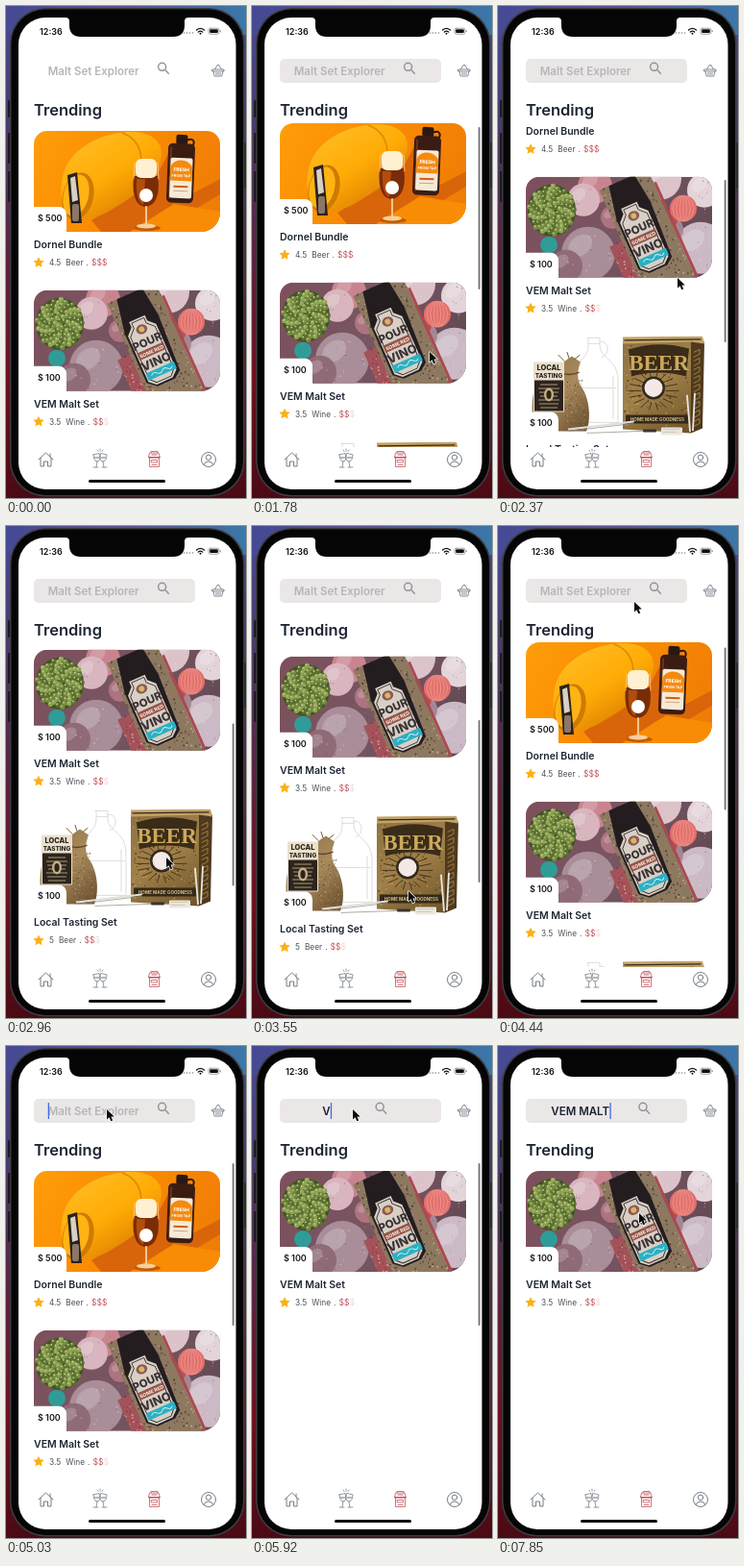
These frames come from a looping animation (250 by 512 pixels, 8 s). An HTML page with a canvas:

```html
<!DOCTYPE html>
<html lang="en">
<head>
<meta charset="utf-8">
<title>Shop list and search</title>
<style>
html, body { margin: 0; width: 100%; height: 100%; overflow: hidden; background: #000; }
canvas { display: block; width: 250px; height: 512px; }
</style>
</head>
<body>
<canvas id="stage"></canvas>
<script>
const LOOP = 8000, STEP = LOOP / 54;
const INK = '#1d2433', LINE = '#66707a', RED = '#c4545a';
const canvas = document.getElementById('stage');
const dpr = window.devicePixelRatio || 1;
canvas.width = 250 * dpr;
canvas.height = 512 * dpr;
const c = canvas.getContext('2d');

// Motion keys: [step, value...], linear in between
const CURSOR = [[5, 219, 374], [7, 181, 362], [11, 182, 364], [12, 185, 360], [14, 187, 312],
  [16, 187, 283], [17, 186, 283], [20, 167, 345], [22, 164, 373], [23, 164, 373], [24, 163, 380],
  [26, 162, 416], [27, 161, 396], [28, 156, 285], [29, 148, 150], [30, 142, 79], [31, 130, 70],
  [34, 105, 66], [49, 105, 66], [51, 125, 125], [53, 147, 174]];
const SCROLL = [[11, 0], [12, 8], [13, 28], [16, 118], [17, 140], [18, 155], [19, 164], [20, 167],
  [23, 167], [24, 160], [26, 124], [27, 80], [28, 44], [29, 22], [30, 9], [31, 4], [33, 0]];
const TYPING = [[40, 'V'], [41, 'VE'], [42, 'VEM'], [46, 'VEM '], [47, 'VEM M'], [48, 'VEM MA'],
  [49, 'VEM MAL'], [50, 'VEM MALT']];

function at(keys, n) {
  const i = keys.findIndex(k => k[0] >= n);
  if (i < 0) return keys[keys.length - 1].slice(1);
  if (i === 0) return keys[0].slice(1);
  const a = keys[i - 1], b = keys[i], p = (n - a[0]) / (b[0] - a[0]);
  return a.slice(1).map((v, j) => v + (b[j + 1] - v) * p);
}

function seeded(seed) {
  return () => (seed = (seed * 16807) % 2147483647) / 2147483647;
}

// Drawing helpers
function rect(color, x, y, w, h, r = 0) {
  c.fillStyle = color;
  c.beginPath();
  c.roundRect(x, y, w, h, r);
  c.fill();
}
function disc(color, x, y, rx, ry = rx, rot = 0) {
  c.fillStyle = color;
  c.beginPath();
  c.ellipse(x, y, rx, ry, rot, 0, 7);
  c.fill();
}
function shape(color, d) {
  c.fillStyle = color;
  c.fill(new Path2D(d));
}
function line(color, width, d) {
  c.strokeStyle = color;
  c.lineWidth = width;
  c.lineCap = c.lineJoin = 'round';
  c.stroke(new Path2D(d));
}
function text(s, x, y, size, weight, color, align = 'left', family = 'Inter, sans-serif') {
  c.font = `${weight} ${size}px ${family}`;
  c.textAlign = align;
  c.textBaseline = 'alphabetic';
  c.fillStyle = color;
  c.fillText(s, x, y);
  return c.measureText(s).width;
}
function group(x, y, draw, rot = 0) {
  c.save();
  c.translate(x, y);
  c.rotate(rot);
  draw();
  c.restore();
}
function ramp(x0, y0, x1, y1, ...colors) {
  const g = c.createLinearGradient(x0, y0, x1, y1);
  colors.forEach((k, i) => g.addColorStop(i / (colors.length - 1), k));
  return g;
}
function speckle(seed, count, x, y, w, h, size, ...colors) {
  const rnd = seeded(seed);
  for (let i = 0; i < count; i++) {
    disc(colors[i % colors.length], x + rnd() * w, y + rnd() * h, size * (.5 + rnd() * .5));
  }
}

// Card pictures, 194 x 105
function kegPicture() {
  rect(ramp(0, 0, 194, 105, '#ff9d08', '#f88a04', '#ee7a06'), 0, 0, 194, 105);
  shape('#d9650a', 'M60 93L124 54L140 24L152 30L152 72L194 50V66L128 105H70Z');
  shape('#f98c05', 'M100 105L146 76L194 84V105Z');
  shape(ramp(50, 5, 104, 90, '#ffbc20', '#ffab06', '#d87a02'),
    'M31 44C38 20 66 3 98 1C120 0 132 9 133 22C134 46 108 66 84 80C66 92 46 96 36 86C27 76 27 58 31 44Z');
  line('#e08a05', 1.5, 'M92 2C110 8 118 25 108 62');
  disc('#cf7a02', 46, 68, 16, 25, .25);
  disc('#ffb414', 44, 67, 13, 22, .25);
  shape('#2c211c', 'M35 46L45 43L50 96H39Z');
  shape('#d9d0c5', 'M38 49L43 47L46 72L40 74Z');
  rect('#8b7766', 40, 76, 7, 18, 2);
  // glass
  disc('#c15a08', 118, 101, 14, 3);
  shape('#7a2c08', 'M104 47C102 66 106 78 116 79C127 78 132 66 129 47Z');
  shape('#b24d0a', 'M107 50C106 66 109 75 114 77L116 50Z');
  rect('#fff0d2', 106, 29, 22, 20, 6);
  line('#f8cf95', .8, 'M105 33L104 50M129 33L130 50');
  line('#f4c78e', 2, 'M117 79V97');
  disc('#f6d09a', 117, 99, 10, 2.5);
  disc('#fff', 117, 67, 7);
  // bottle
  group(153, 44, () => {
    rect('#2b1712', -6, -40, 12, 10, 2);
    line('#2b1712', 2, 'M6 -35C13 -38 14 -31 10 -28');
    rect('#3b1c12', -14, -31, 28, 62, 5);
    rect('#6c3420', -12, -27, 2, 54, 1);
    rect('#f6ead6', -11, -16, 23, 42, 2);
    shape('#f58a10', 'M-11 8V-6C-8 -16 8 -16 12 -6V8Z');
    text('FRESH', .5, -2, 5, 800, '#fff', 'center');
    text('FROM TAP', .5, 4, 3.8, 700, '#fff', 'center');
    rect('#d45b18', -7, 13, 15, 2);
    rect('#c8a98a', -7, 18, 15, 1);
  }, .04);
}

function winePicture() {
  rect(ramp(0, 0, 194, 105, '#7d4f5b', '#775662', '#5d4651'), 0, 0, 194, 105);
  const balloons = [['#c9848f', 72, 10, 18], ['#d9b6bf', 60, 24, 17], ['#a98d99', 65, 80, 28],
    ['#8f6a77', 42, 93, 17], ['#dcc3c9', 140, 2, 22], ['#e3d4d9', 186, 14, 18],
    ['#cbbac5', 182, 74, 27], ['#a58895', 150, 55, 14], ['#ad7480', 90, 42, 12]];
  for (const [color, x, y, r] of balloons) {
    disc(color, x, y, r);
    disc('#ffffff30', x - r * .3, y - r * .3, r * .5, r * .36, -.7);
  }
  speckle(41, 130, 38, 4, 154, 100, .8, '#f4e4e690', '#5d404a70');
  disc('#2f9c98', 24, 71, 9);
  disc('#b84f50', 149, 45, 9);
  disc('#e2706c', 164, 33, 14);
  for (let i = -3; i < 4; i++) line('#f2a298', .7, `M${164 + i * 1.4} 20Q${164 + i * 6} 33 ${164 + i * 1.4} 46`);
  // grapes
  disc('#3f5322', 27, 35, 25, 27);
  for (let i = 0; i < 95; i++) {
    const a = i * 2.4, r = 2.45 * Math.sqrt(i);
    const x = 27 + Math.cos(a) * r, y = 35 + Math.sin(a) * r * 1.08;
    disc(['#768a40', '#8fa354', '#5b7030'][i % 3], x, y, 2.7);
    disc('#c3cf92', x - .8, y - .9, .9);
  }
  // box
  group(122, 55, () => {
    rect('#a4525a', -39, 2, 18, 70);
    speckle(7, 60, -39, 2, 18, 70, 1, '#d99a95', '#7b3640');
    rect('#8d7860', -25, -56, 55, 130);
    speckle(19, 260, -25, -56, 55, 130, 1.1, '#4b3b33', '#c0a582', '#6d5544');
    rect('#a94a50', 30, -40, 3, 110);
    shape('#241d20', 'M-14 -56H15L19 -24L16 38L8 44H-12L-21 36V-20Z');
    group(-1, 8, () => {
      shape('#d8d0c6', 'M-18 -24L-11 -31V-37H7V-31L14 -24V28L7 34H-11L-18 28Z');
      line('#3a2b2c', .9, 'M-16 -22L-9 -29V-35H5V-29L12 -22V26L6 32H-10L-16 26Z');
      disc('#8a5a50', -2, -25, 6, 5);
      disc('#d9b36a', -2, -25, 3);
      text('POUR', -2, -7, 11.5, 800, '#3a3234', 'center');
      rect('#94544c', -17, -4, 30, 8);
      text('SOME RED', -2, 2.3, 5.2, 800, '#f3e4d3', 'center');
      text('VINO', -2, 16, 12.5, 800, '#3a3234', 'center');
      rect('#2bb0c2', -17, 19, 32, 8, 1);
      line('#d5f0ef', .9, 'M-12 23Q-9 20 -6 23T0 23T6 23T11 23');
    });
  }, -.42);
}

function beerPicture() {
  rect('#fff', 0, 0, 194, 105);
  // glass jug
  line('#d4d4d0', .8, 'M64 2H77V10C78 25 95 22 96 46V90H48V46C49 24 65 26 65 10V2M65 8H77M50 54H94M77 6C87 4 88 20 79 22');
  line('#e6e6e2', 1.4, 'M54 40V84M91 42V86');
  // sack
  shape(ramp(5, 30, 66, 90, '#8f7148', '#a98a5c', '#6f5433'),
    'M14 29C24 34 38 30 42 25L48 21L57 27C54 36 52 44 58 53C67 66 68 88 63 99H9C5 80 6 64 10 52Z');
  line('#5f4526', 1.5, 'M38 39C44 41 50 40 55 38');
  line('#6b5a35', 1, 'M40 26L34 20M45 23L43 17M51 24L56 20');
  speckle(11, 110, 41, 46, 20, 52, .7, '#c3a473', '#5f4828');
  rect('#e9e0cd', 8, 27, 32, 52, 1);
  rect('#2c241d', 9, 46, 30, 32);
  text('LOCAL', 24, 36, 7.4, 800, '#2c241d', 'center');
  text('TASTING', 24, 44, 6.4, 800, '#2c241d', 'center');
  for (let y = 50; y < 76; y += 4) rect('#a99a78', 13 + y % 3, y, 22 - y % 3 * 2, 1);
  disc('#c6b083', 24, 61, 5, 7);
  disc('#2c241d', 24, 61, 2.6, 4.5);
  // box
  shape('#4f3a1e', 'M172 4L186 6L184 96L172 101Z');
  shape(ramp(101, 0, 172, 100, '#8d7040', '#a08049', '#6f5429'), 'M101 4H172V101L101 97Z');
  shape('#c2a267', 'M101 1L184 0L186 8L172 6L101 8Z');
  line('#33291b', 1.4, 'M103 4.5L182 3.5');
  speckle(29, 150, 103, 10, 67, 84, .9, '#4a361b', '#c4a25c');
  shape('#3a2c18', 'M107 14Q138 4 170 13L167 42Q138 34 110 42Z');
  text('BEER', 138.5, 36, 23, 800, '#cda85c', 'center', 'Liberation Serif, serif');
  for (let i = 0; i < 18; i++) {
    const x = Math.cos(i * Math.PI / 9), y = Math.sin(i * Math.PI / 9);
    line('#4a361b', 1, `M${133 + x * 13} ${57 + y * 13}L${133 + x * 26} ${57 + y * 20}`);
  }
  disc('#33291b', 133, 54, 12);
  disc('#f3e9e6', 133, 54, 9.5);
  rect('#33291b', 104, 82, 66, 9, 1);
  text('HOME MADE GOODNESS', 137, 88.5, 4.6, 700, '#d9be80', 'center');
  for (let y = 14; y < 90; y += 9) line('#a07f45', 1, `M175 ${y + 3}L181 ${y}V${y + 5}L175 ${y + 8}`);
  // tubes and small parts
  line('#e9e6df', 1.8, 'M168 62L171 99M176 60L174 98');
  line('#e2e0da', 2, 'M45 97L112 89');
  line('#8d877c', .7, 'M45 99L112 91M64 101L150 98');
  rect('#3a3530', 122, 97, 14, 3, 1);
  rect('#ece7dc', 141, 95, 22, 8, 1);
  line('#b5afa4', .6, 'M143 97H160M143 100H157');
}

const CARDS = [
  { name: 'Dornel Bundle', price: '$ 500', score: '4.5', kind: 'Beer', cost: 3, draw: kegPicture },
  { name: 'VEM Malt Set', price: '$ 100', score: '3.5', kind: 'Wine', cost: 2, draw: winePicture },
  { name: 'Local Tasting Set', price: '$ 100', score: '5', kind: 'Beer', cost: 2, draw: beerPicture }
];

function star(x, y, r) {
  c.fillStyle = '#fbb016';
  c.beginPath();
  for (let i = 0; i < 10; i++) {
    const a = i * Math.PI / 5 - Math.PI / 2, q = i % 2 ? r * .48 : r;
    c.lineTo(x + Math.cos(a) * q, y + Math.sin(a) * q);
  }
  c.closePath();
  c.fill();
}

function card(item, y) {
  group(29, y, () => {
    c.save();
    c.beginPath();
    c.roundRect(0, 0, 194, 105, [14, 14, 20, 0]);
    c.clip();
    item.draw();
    c.restore();
    rect('#fff', -1, 79, 35, 27, [0, 8, 0, 0]);
    text(item.price, 4, 94, 9, 600, '#16181d');
    text(item.name, 0, 122, 10.5, 600, INK);
    star(5, 137, 6);
    let x = 16;
    x += text(item.score, x, 140, 8.3, 400, '#4b5058') + 5;
    x += text(item.kind, x, 140, 8.3, 400, '#4b5058') + 3;
    x += text('.', x, 140, 8.3, 400, '#4b5058') + 3;
    for (let i = 0; i < 3; i++) x += text('$', x, 140, 8.6, 400, i < item.cost ? RED : '#ecd9da');
  });
}

function phone() {
  rect(ramp(0, 0, 0, 512, '#454a94', '#4a3a6a', '#5a2240', '#701020', '#4a0a14'), 0, 0, 250, 512);
  rect(ramp(0, 0, 250, 0, '#454a94', '#5a5090', '#3a78a8'), 0, 0, 250, 30);
  rect('#1b1b1e', 2, 98, 3, 18, 1);
  rect('#1b1b1e', 2, 132, 3, 32, 1);
  rect('#1b1b1e', 2, 172, 3, 32, 1);
  rect('#1b1b1e', 247, 142, 2.5, 48, 1);
  rect('#3c3c40', 4, 2, 244.5, 508.5, 37);
  rect('#050506', 5.5, 3.5, 241.5, 505.5, 35.5);
  rect('#fff', 13, 12, 226.5, 491, 28);
  shape('#050506', 'M62 11H190V12Q186 12 186 16V20Q186 32 174 32H78Q66 32 66 20V16Q66 12 62 12Z');
  text('12:36', 35, 29.5, 9, 600, '#111');
  for (let i = 0; i < 4; i++) disc('#888', 185.5 + i * 3, 28, .8);
  line('#111', 1.3, 'M198.5 25Q202.5 21.7 206.5 25M200.3 27Q202.5 25.3 204.7 27');
  disc('#111', 202.5, 28.8, 1);
  c.strokeStyle = '#777';
  c.lineWidth = .7;
  c.beginPath();
  c.roundRect(211, 23.2, 11, 6, 1.8);
  c.stroke();
  rect('#111', 212.2, 24.3, 8.6, 3.8, 1);
  rect('#777', 222.8, 25.2, .9, 2, .5);
}

function tabs() {
  line(LINE, .9, 'M34 472L41.5 465L49 472M36 470.5V479H39.5V474H43.5V479H47V470.5M46 466V469');
  line(LINE, .7, 'M91 467L97 465.5L98 471Q97 475 94 474Q91 472 91 467ZM99 465.5L105 467Q105 472 102 474Q99 475 98 471ZM95 474L94 480M101 474L102 480M91 480H96M100 480H105M98 461V463M95 462L96 463.5M101 462L100 463.5');
  line(LINE, 1, 'M92.5 470L96.5 470M99.5 470H103.5');
  line(RED, .8, 'M149.5 470V479.5H159.5V470M150 465H159L160.3 470H148.7ZM151 465V463.5H158V465M151.5 472.5H157.5V475H151.5ZM152 477.5H157');
  line(RED, 1.2, 'M149 469.6H160M152 467H157');
  line(LINE, .9, 'M218.5 472A7.5 7.5 0 1 1 203.5 472A7.5 7.5 0 1 1 218.5 472M213.7 469.8A2.7 2.7 0 1 1 208.3 469.8A2.7 2.7 0 1 1 213.7 469.8M206 477.5Q207 474 211 474T216 477.5');
  rect('#0a0a0a', 86, 493, 80, 3, 1.5);
}

function search(n, typed) {
  if (n >= 12) rect('#ebe7e7', 29, 55, 168, 25, 5);
  const s = typed || 'Malt Set Explorer';
  c.font = '600 11.5px Inter, sans-serif';
  const tw = c.measureText(s).width;
  // The field grows with its text and stays centred with the icon
  const half = 28 + tw * .34, x = 104 - half, icon = 104 + half;
  text(s, x, 72, 11.5, 600, typed ? INK : '#b6b5b7');
  line('#949498', 1.5, `M${icon + 2.3} 63.3A4 4 0 1 1 ${icon - 5.7} 63.3A4 4 0 1 1 ${icon + 2.3} 63.3M${icon + 1.3} 66.2L${icon + 5} 70.2`);
  const caret = n < 34 ? 0 : n < 37 ? 1 : n < 38 ? .5 : n < 40 ? 0 : 1;
  if (caret) {
    c.globalAlpha = caret;
    rect('#4169e8', typed ? x + tw + .3 : x, 59, 1.3, 17, .6);
    c.globalAlpha = 1;
  }
  line(LINE, .8, 'M215 66H227V68H215ZM216 68L217.2 73H224.8L226 68M217.5 66L220 61.5H222L224.5 66M219 69.5V71.5M221 69.5V71.5M223 69.5V71.5');
}

function pointer(x, y) {
  group(x, y, () => {
    const d = 'M0 0V10.5L2.5 8.3L4.3 12.3L6.2 11.5L4.5 7.6H7.8Z';
    line('#fff', 1.4, d);
    shape('#0b0b0b', d);
  });
}

function render(n) {
  c.setTransform(dpr, 0, 0, dpr, 0, 0);
  const entry = TYPING.filter(k => k[0] <= n).pop();
  const typed = entry ? entry[1] : '';
  const scroll = at(SCROLL, n)[0];
  phone();
  search(n, typed);
  text('Trending', 29, 114, 16.5, 600, INK);

  c.save();
  c.beginPath();
  c.rect(13, 119, 225, 340);
  c.clip();
  const items = typed ? CARDS.filter(k => k.name.toUpperCase().startsWith(typed)) : CARDS;
  items.forEach((item, i) => card(item, 130 + i * 165.7 - scroll));
  c.restore();

  if (n >= 12 && n < 42) {
    c.globalAlpha = n === 41 ? .4 : 1;
    rect('#77777a', 235.7, 122 + scroll * .5, 1.9, 169, 1);
    c.globalAlpha = 1;
  }
  tabs();
  if (n >= 5) pointer(...at(CURSOR, n));
}

let shown = -1;
function tick() {
  const n = Math.min(53, Math.floor((performance.now() % LOOP) / STEP + .05));
  if (n !== shown) render(shown = n);
  requestAnimationFrame(tick);
}
tick();
</script>
</body>
</html>
```
